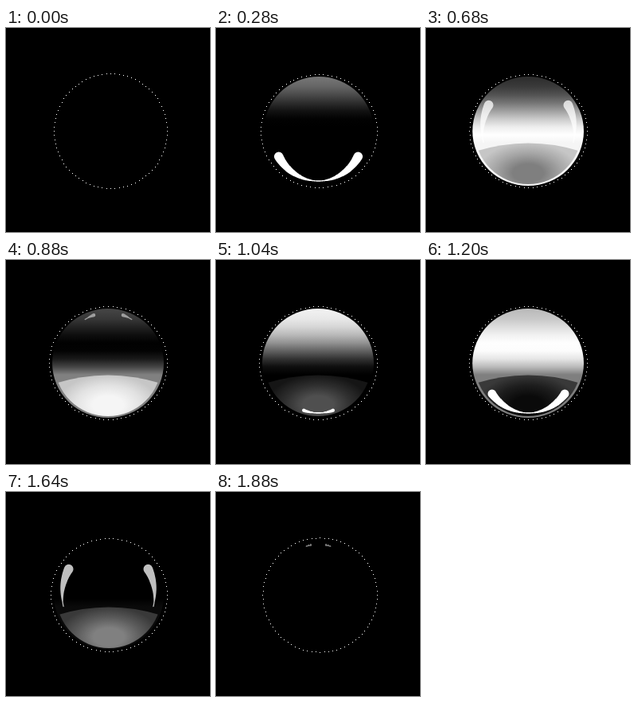
Write an HTML page with a canvas that moves like this. It is 256 px wide and 256 px high and loops after 1920 ms.

```html
<!DOCTYPE html>
<html lang="en">
<head>
<meta charset="utf-8">
<title>Pulsing orb</title>
<style>
  html, body { margin: 0; width: 100%; height: 100%; overflow: hidden; background: #000; }
  canvas { display: block; width: 256px; height: 256px; }
</style>
</head>
<body>
<canvas id="stage" width="256" height="256"></canvas>
<script>
const ctx = document.getElementById('stage').getContext('2d');
const LOOP = 1920, STEP = 40, SWEEP = LOOP / 2, PULSE = LOOP / 3;
const TAU = Math.PI * 2, CY = 129.5;

const clamp = v => Math.min(1, Math.max(0, v));

// Two pulses of light pass each point, later the further it lies down the orb
function light(t, delay) {
  const age = t - delay;
  const v = age > 0 && age < 2 * PULSE ? Math.sin(Math.PI * age / PULSE) ** 2 : 0;
  const c = Math.round(v * 255);
  return `rgb(${c},${c},${c})`;
}

function ellipse(x, y, rx, ry) {
  ctx.beginPath();
  ctx.ellipse(x, y, rx, ry, 0, 0, TAU);
}

function drawBody(t, x, rx) {
  const fill = ctx.createLinearGradient(0, 64, 0, 144);
  const n = 8;
  for (let i = 0; i <= n; i++) {
    const u = i / n;
    fill.addColorStop(u, light(t, 130 + 270 * u ** 1.5));
  }
  ellipse(x, CY, rx, 68.5);
  ctx.fillStyle = fill;
  ctx.fill();
}

function drawBowl(t, x, rx) {
  ctx.save();
  ellipse(x, CY, rx, 66.5);
  ctx.clip();
  ctx.beginPath();
  ctx.moveTo(x - 70, 156);
  ctx.quadraticCurveTo(x, 133, x + 70, 156);
  ctx.lineTo(x + 70, 210);
  ctx.lineTo(x - 70, 210);
  ctx.clip();

  ctx.translate(x, 182);
  ctx.scale(64, 38);
  const fill = ctx.createRadialGradient(0, 0, 0, 0, 0, 1);
  fill.addColorStop(.3, light(t, 520));
  fill.addColorStop(.65, light(t, 490));
  fill.addColorStop(1, light(t, 460));
  ctx.fillStyle = fill;
  ctx.fillRect(-2, -2, 4, 4);
  ctx.restore();
}

// Two tapered arcs climb from the bottom and meet at the top, fading on the way
function drawSweep(t) {
  const u = t % SWEEP / SWEEP;
  if (u === 0) return;
  const head = Math.PI * u + .12 * Math.sin(TAU * u);
  const tail = Math.PI * clamp((u - .46) / .54) ** 1.1;
  const size = Math.sin(head) * 6.8, n = 120;

  ctx.beginPath();
  for (const side of [-1, 1]) {
    for (let i = 0; i <= n; i++) {
      const k = i / n, a = tail + (head - tail) * k;
      const r = Math.max(.7, size * k);
      const x = 128.5 + side * 58 * Math.sin(a), y = 129 + 63 * Math.cos(a);
      ctx.moveTo(x + r, y);
      ctx.arc(x, y, r, 0, TAU);
    }
  }
  ctx.globalAlpha = 1 - 1.2 * clamp(u - .5);
  ctx.fillStyle = '#fff';
  ctx.fill();
  ctx.globalAlpha = 1;
}

function drawRing(x, rx, ry) {
  const n = 84;
  ctx.fillStyle = '#fff';
  for (let i = 0; i < n; i++) {
    const a = i / n * TAU;
    ctx.fillRect(Math.round(x + rx * Math.cos(a)), Math.round(129 + ry * Math.sin(a)), 1, 1);
  }
}

function draw(now) {
  const t = Math.floor(now / STEP) * STEP % LOOP;
  const swell = 3 * Math.sqrt(Math.sin(Math.PI * t / LOOP));
  const x = 131 - swell, rx = 71 + swell;
  ctx.fillStyle = '#000';
  ctx.fillRect(0, 0, 256, 256);
  drawBody(t, x, rx - 4);
  drawBowl(t, x, rx - 7);
  drawSweep(t);
  drawRing(x, rx, 72 - swell * .4);
}

function tick() {
  draw(performance.now());
  requestAnimationFrame(tick);
}
tick();
</script>
</body>
</html>
```
